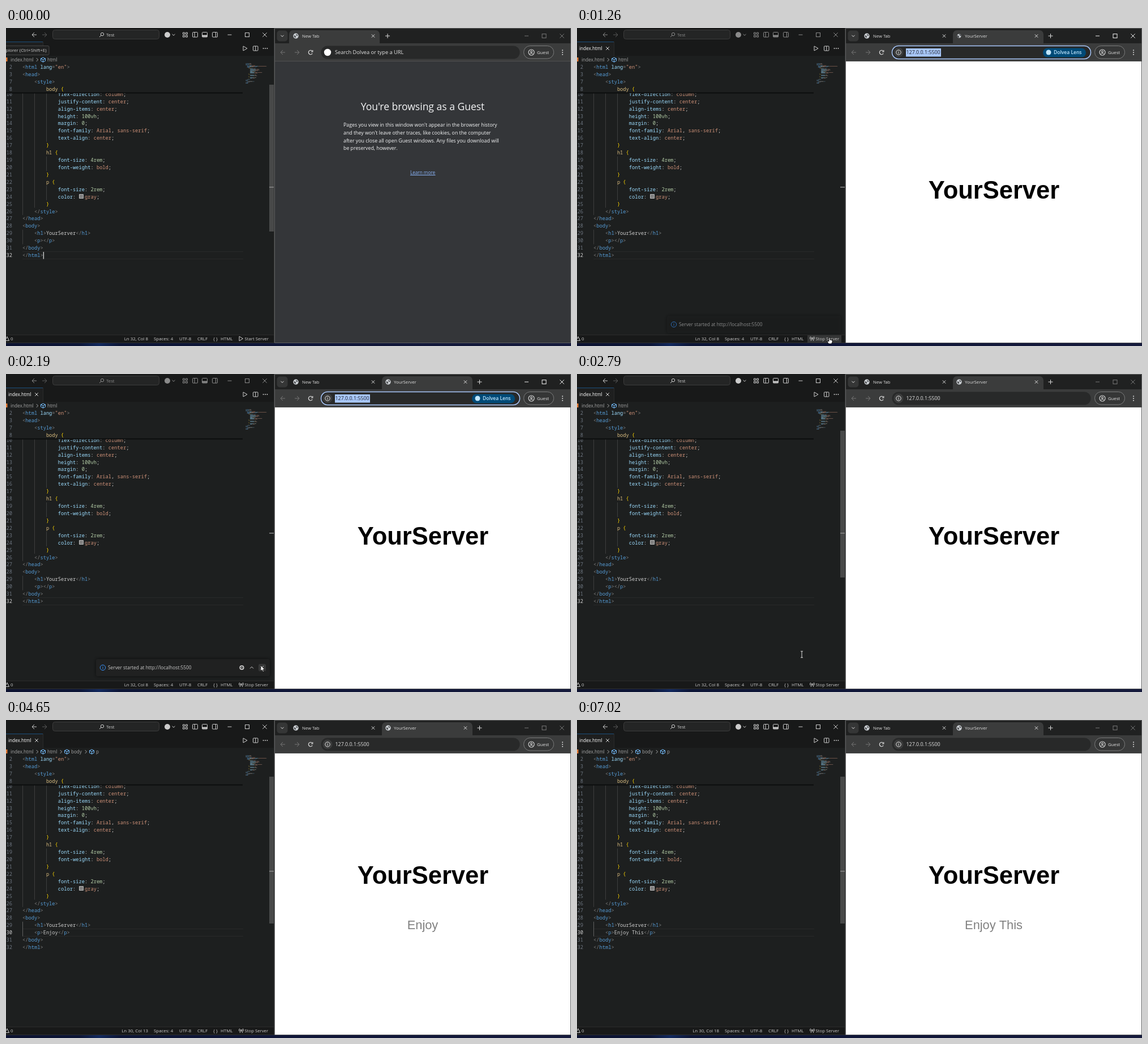
Recreate the animation shown at these times as an HTML page with a canvas. Size 998 px wide and 561 px high, loop 7050 ms.

```html
<!DOCTYPE html>
<html lang="en">
<head>
<meta charset="utf-8">
<title>Live server</title>
<style>
  html, body { margin: 0; width: 100%; height: 100%; overflow: hidden; background: #181818; }
  canvas { display: block; width: 998px; height: 561px; }
</style>
</head>
<body>
<canvas id="stage" width="998" height="561"></canvas>
<script>
const ctx = document.getElementById('stage').getContext('2d');
const LOOP = 7050, STEP = 30;
const UI = '"Open Sans", "Noto Sans", sans-serif';
const MONO = '"Noto Sans Mono", "DejaVu Sans Mono", monospace';
const PAGE = '"Liberation Sans", Arial, sans-serif';
const CHAR = 5.236, ROW = 12.92, CODE_X = 29, CODE_SIZE = 8.727;

// Times in ms at which the state changes
const T = { tipOff: 150, start: 1170, page: 1200, dismiss: 2250, line30: 3240,
  saved1: 4350, popup: 5550, popupOff: 6210, saved2: 6510 };
const TYPED = 'Enjoy This';
const KEYS = [3390, 3450, 3510, 3630, 3720, 5100, 5460, 5640, 5850, 6030];
const POINTER = [[0, -8, 40], [120, -8, 40], [720, 446, 546], [1800, 446, 546],
  [2100, 450, 514], [2670, 450, 514], [3180, 72, 376]];

const CODE = `<!DOCTYPE html>
<html lang="en">
<head>
    <meta charset="UTF-8">
    <meta name="viewport" content="width=device-width">
    <title>YourServer</title>
    <style>
        body {
            display: flex;
            flex-direction: column;
            justify-content: center;
            align-items: center;
            height: 100vh;
            margin: 0;
            font-family: Arial, sans-serif;
            text-align: center;
        }
        h1 {
            font-size: 4rem;
            font-weight: bold;
        }
        p {
            font-size: 2rem;
            color: gray;
        }
    </style>
</head>
<body>
    <h1>YourServer</h1>
    <p></p>
</body>
</html>`.split('\n');

function rect(x, y, w, h, fill) {
  ctx.fillStyle = fill;
  ctx.fillRect(x, y, w, h);
}

function box(x, y, w, h, r, fill, stroke, width = 1) {
  ctx.beginPath();
  ctx.roundRect(x, y, w, h, r);
  paint(fill, stroke, width);
}

function paint(fill, stroke, width = 1) {
  if (fill) { ctx.fillStyle = fill; ctx.fill(); }
  if (stroke) { ctx.strokeStyle = stroke; ctx.lineWidth = width; ctx.stroke(); }
}

function circle(x, y, r, fill, stroke, width) {
  ctx.beginPath();
  ctx.arc(x, y, r, 0, 7);
  paint(fill, stroke, width);
}

function trace(points, x, y) {
  ctx.beginPath();
  for (let i = 0; i < points.length; i += 2) ctx.lineTo(x + points[i], y + points[i + 1]);
}

function line(x, y, points, color, width = 1) {
  trace(points, x, y);
  paint(null, color, width);
}

// y is the middle of the capitals
function text(s, x, y, size, color, { font = UI, weight = 400, align = 'left' } = {}) {
  ctx.font = `${weight} ${size}px ${font}`;
  ctx.textAlign = align;
  ctx.fillStyle = color;
  ctx.fillText(s, x, y + size * 0.35);
}

function mono(s, x, y, color, align) {
  text(s, x, y, CODE_SIZE, color, { font: MONO, weight: 500, align });
}

function cross(x, y, r, color, width = 1) {
  line(x, y, [-r, -r, r, r], color, width);
  line(x, y, [r, -r, -r, r], color, width);
}

function chevron(x, y, w, h, color) {
  line(x, y, [-w, -h, 0, h, w, -h], color);
}

function arrow(x, y, dir, color) {
  line(x, y, [-4 * dir, 0, 4 * dir, 0], color);
  line(x, y, [0, -4, 4 * dir, 0, 0, 4], color);
}

function plus(x, y, color) {
  line(x, y, [-4, 0, 4, 0], color);
  line(x, y, [0, -4, 0, 4], color);
}

function windowButtons(xs, y, color) {
  line(xs[0], y, [-3.5, 0, 3.5, 0], color);
  ctx.strokeStyle = color;
  ctx.strokeRect(xs[1] - 3.5, y - 3.5, 7, 7);
  cross(xs[2], y, 3.7, color);
}

function dots(x, y, dx, dy, color) {
  for (const k of [-1, 0, 1]) circle(x + k * dx, y + k * dy, 0.95, color);
}

function info(x, y, r, color) {
  circle(x, y, r, null, color);
  rect(x - 0.5, y - 0.7, 1, 3, color);
  rect(x - 0.5, y - 2.5, 1, 1, color);
}

function globe(x, y, r) {
  circle(x, y, r, '#c9cdd1');
  ctx.fillStyle = '#4a4d50';
  trace([-3.3, -1, -1, -0.5, 0.2, 1.5, -1, 3.5, -3, 1.5], x, y);
  ctx.fill();
  trace([0, -3.5, 3, -2, 3, 0, 1, -0.5], x, y);
  ctx.fill();
}

function tokens(s) {
  const markup = s.includes('<');
  const rule = markup
    ? /(<[!\/]?)(\w+)|(\w+)(?==)|("[^"]*")|([<>=])|(\s+|[^<>="\s]+)/g
    : /([a-z-]+)(?=:)|(\w+)(?= \{)|([{}])|(\d\w*)|([A-Za-z][\w-]*)|(\s+|[:;,])/g;
  const colors = markup
    ? ['#808080', '#569cd6', '#9cdcfe', '#ce9178', '#808080', '#cccccc']
    : ['#9cdcfe', '#d7ba7d', '#ffd700', '#b5cea8', '#ce9178', '#cccccc'];
  const list = [];
  for (const m of s.matchAll(rule))
    m.slice(1).forEach((part, i) => part && list.push([part, colors[i]]));
  return list;
}

function codeLine(s, y) {
  let x = CODE_X;
  for (const [part, color] of tokens(s)) {
    if (part === 'gray') {
      box(Math.round(x) + 1.5, Math.round(y) - 4.5, 7, 7, 0, '#808080', '#b8b8b8');
      x += 10.6;
    }
    mono(part, x, y, color);
    x += part.length * CHAR;
  }
}

const rowY = n => 401 - (32 - n) * ROW;

function pointerAt(t) {
  const last = POINTER[POINTER.length - 1];
  const i = POINTER.findIndex(k => k[0] > t);
  if (i < 0) return { x: last[1], y: last[2] };
  const [a, b] = [POINTER[i - 1], POINTER[i]];
  const k = (t - a[0]) / (b[0] - a[0]), e = k * k * (3 - 2 * k);
  return { x: a[1] + (b[1] - a[1]) * e, y: a[2] + (b[2] - a[2]) * e };
}

function stateAt(t) {
  const count = KEYS.filter(k => k <= t).length;
  const running = t >= T.start, onP = t >= T.line30;
  const focused = t < T.start || t >= T.dismiss;
  const lastInput = Math.max(0, ...[T.dismiss, T.line30, ...KEYS].filter(k => k <= t));
  const blinkFrom = t < T.start ? 900 : lastInput;
  return {
    t, running, onP, focused, typed: TYPED.slice(0, count),
    dirty: (count > 0 && t < T.saved1) || (count > 5 && t < T.saved2),
    shown: t >= T.saved2 ? TYPED : t >= T.saved1 ? 'Enjoy' : '',
    caret: focused && (t < 500 || Math.floor((t - blinkFrom) / 500) % 2 === 0),
    notice: running && !focused,
    popup: t >= T.popup && t < T.popupOff,
    busy: t >= T.popup && t < T.popupOff + 30,
    slider: t < 690 || t >= 2730,
    pointer: pointerAt(t)
  };
}

function titleBar(s) {
  const color = s.focused ? '#cccccc' : '#8a8a8a';
  rect(0, 0, 474, 23, '#181919');
  arrow(50, 12, -1, color);
  arrow(68, 12, 1, '#5a5a5a');
  box(82.5, 3.5, 188, 16, 4, '#242525', '#3c3c3c');
  circle(170, 11, 2.7, null, color);
  line(168, 13, [0, 0, -3, 3], color);
  text('Test', 177, 12, 7.8, color);
  circle(285, 12, 5, color);
  chevron(296, 12, 2.5, 1.2, color);
  for (const [x, y] of [[312, 8], [317, 8], [312, 13], [317, 13]]) box(x + 0.5, y, 3, 3, 0, null, color);
  for (const x of [334, 351, 369]) box(x - 4.5, 7.5, 9, 8.5, 1, null, color);
  line(333, 8, [0, 0, 0, 8], color);
  rect(347, 12.5, 8, 3, color);
  line(370.5, 8, [0, 0, 0, 8], color);
  windowButtons([395, 426, 457], 12, color);
}

function tabBar(s) {
  rect(0, 23, 474, 26, '#181919');
  rect(0, 24, 65, 25, '#1e1f1f');
  rect(0, 24, 65, 1, '#1c4f7c');
  rect(65, 24, 1, 25, '#2b2b2b');
  text('index.html', 4, 36, 8.2, '#ffffff');
  if (s.dirty) circle(54, 36, 2.8, '#ffffff');
  else cross(54, 36, 2.8, '#dddddd');
  trace([-3, -4, 4, 0, -3, 4, -3, -4], 422, 36);
  paint(null, '#cccccc');
  box(436.5, 32, 8.5, 8, 1, null, '#cccccc');
  line(440.7, 32, [0, 0, 0, 8], '#cccccc');
  dots(458, 36, 3.4, 0, '#cccccc');
}

function crumbs(s) {
  const gray = '#a5a5a5';
  rect(0, 52, 2.5, 7, '#e37933');
  text('index.html', 8, 56, 8.2, gray);
  const parts = [['html', 55]];
  if (s.onP) parts.push(['body', 97], ['p', 141]);
  for (const [name, x] of parts) {
    line(x, 56, [-1.3, -3, 1.5, 0, -1.3, 3], gray);
    trace([-4, -2, 0, -4, 4, -2, 4, 2, 0, 4, -4, 2, -4, -2, 0, 0, 4, -2], x + 10.5, 56);
    paint(null, '#75beff');
    line(x + 10.5, 56, [0, 0, 0, 4], '#75beff');
    text(name, x + 18, 56, 8.1, gray);
  }
}

function minimap(s) {
  ctx.globalAlpha = 0.55;
  CODE.forEach((src, i) => {
    let x = 423;
    for (const [part, color] of tokens(src)) {
      if (part.trim()) rect(x, 62.5 + i * 1.12, part.length * 0.68, 0.8, color);
      x += part.length * 0.68;
    }
  });
  ctx.globalAlpha = 1;
  if (s.slider) rect(465, 100, 8, 259, '#484949');
  rect(465, s.onP ? 266 : 280, 8, 1.5, '#8a8a8a');
}

function editor(s) {
  const current = s.onP ? 30 : 32;
  ctx.save();
  ctx.beginPath();
  ctx.rect(0, 114, 474, 427);
  ctx.clip();
  for (const edge of [-7, 6]) rect(CODE_X, Math.round(rowY(current)) + edge, 390, 1, '#282929');
  const guides = [[0, 9, 26], [4, 9, 25], [8, 9, 16], [8, 19, 20], [8, 23, 24], [0, 29, 30]];
  guides.forEach(([col, from, to], i) => {
    const top = rowY(from) - ROW / 2;
    const active = s.onP && i === 5;
    rect(Math.round(CODE_X + col * CHAR), top, 1, (to - from + 1) * ROW, active ? '#606060' : '#3d3e3e');
  });
  for (let n = 10; n <= 32; n++) {
    const y = rowY(n);
    const src = n === 30 ? `    <p>${s.typed}</p>` : CODE[n - 1];
    mono(n, 11, y, n === current ? '#d0d0d0' : '#6e7681', 'right');
    codeLine(src, y);
  }
  if (s.caret) {
    const col = s.onP ? 7 + s.typed.length : 7;
    rect(CODE_X + col * CHAR, rowY(current) - 6, 1.4, 12.5, '#d0d0d0');
  }
  ctx.restore();

  [2, 3, 7, 8].forEach((n, i) => {
    const y = 69 + i * ROW;
    mono(n, 11, y, '#6e7681', 'right');
    codeLine(CODE[n - 1], y);
  });
  rect(0, 113.5, 418, 2, '#0d0e0e');
  minimap(s);
}

function wrench(x, y) {
  line(x, y, [-4, 4, 0.5, -0.5], '#cccccc', 1.8);
  ctx.beginPath();
  ctx.arc(x + 2, y - 2, 2.3, -0.4, 4.4);
  paint(null, '#cccccc', 1.3);
}

function suggestions(s) {
  if (!s.popup) return;
  const word = s.typed.slice(6);
  const rows = 'Thead'.startsWith(word) ? [word, 'Thead'] : [word];
  box(107.5, 382.5, 294, rows.length * 13 + 1, 2, '#202121', '#454545');
  rect(108, 383, 293, 12.5, '#04395e');
  rows.forEach((name, i) => {
    const y = 389 + i * ROW;
    wrench(115, y);
    mono(name, 123, y, '#d4d4d4');
    mono(word, 123, y, '#5eb8ff');
  });
  text('Emmet Abbreviation', 395, 389, 7.5, '#d4d4d4', { font: MONO, weight: 500, align: 'right' });
}

function antenna(x, y, color) {
  line(x, y, [-2.5, 4, 0, -1, 2.5, 4], color);
  circle(x, y - 1, 1, color);
  for (const d of [-1, 1]) for (const r of [2.2, 4]) {
    ctx.beginPath();
    ctx.arc(x, y - 1, r, d < 0 ? 2.4 : -0.75, d < 0 ? 3.9 : 0.75);
    paint(null, color, 0.9);
  }
}

function statusBar(s) {
  const color = '#cccccc', size = 7.9, y = 548;
  rect(0, 541, 474, 14, '#181919');
  rect(0, 541, 474, 1, '#2b2b2b');
  if (s.pointer.y > 541 && s.pointer.x > 407) rect(407, 542, 60, 13, '#353636');
  trace([-3.5, 3.5, 0, -3.5, 3.5, 3.5, -3.5, 3.5], 2, y);
  paint(null, color);
  text('0', 8, y, size, color);
  const where = s.onP ? `Ln 30, Col ${8 + s.typed.length}` : 'Ln 32, Col 8';
  text(where, 251, y, size, color, { align: 'right' });
  text('Spaces: 4', 261, y, size, color);
  text('UTF-8', 306, y, size, color);
  text('CRLF', 338, y, size, color);
  if (s.busy) {
    const a = (s.t - 5700) / 1000 * 6.283 - 2.4;
    ctx.beginPath();
    ctx.arc(371, y, 4, a, a + 1.7);
    paint(null, color);
  } else {
    text('{ }', 366, y, size, color);
  }
  text('HTML', 379, y, size, color);
  if (s.running) antenna(415.5, y, color);
  else {
    trace([-3, -4, 3.5, 0, -3, 4, -3, -4], 415, y);
    paint(null, color);
  }
  text(s.running ? 'Stop Server' : 'Start Server', 421.5, y, 7.75, color);
}

function notice(s) {
  if (!s.notice) return;
  const k = Math.min(1, (s.t - T.start) / 180), y = 528 - 10 * k;
  ctx.save();
  ctx.globalAlpha = 0.3 + 0.7 * k;
  ctx.shadowColor = 'rgba(0,0,0,.6)';
  ctx.shadowBlur = 6;
  box(159, y - 15, 307, 30, 3, '#202121');
  ctx.shadowBlur = 0;
  info(171, y, 4.7, '#3794ff');
  text('Server started at http://localhost:5500', 180, y, 8.35, '#c8c8c8');
  if (s.pointer.y < 541) {
    circle(416.5, y, 3.2, null, '#cccccc', 1.8);
    circle(416.5, y, 1, '#cccccc');
    chevron(434, y, 3, -1.5, '#cccccc');
    box(446, y - 6.5, 13, 13, 3, '#383939');
    cross(452, y, 3, '#cccccc');
  }
  ctx.restore();
}

function tooltip(s) {
  if (s.t >= T.tipOff) return;
  box(-6, 31.5, 82, 16, 2, '#202121', '#454545');
  text('Explorer (Ctrl+Shift+E)', 71.5, 39.5, 7.9, '#cccccc', { align: 'right' });
}

function browserTabs(s) {
  rect(474, 0, 524, 28, '#202121');
  box(478.5, 4.5, 19, 19, 5, '#353636');
  chevron(488, 14, 2.6, 1.3, '#dddddd');
  const x = s.running ? 664 : 500;
  box(x, 4, 160, 26, [7, 7, 0, 0], '#3b3c3c');
  globe(512, 14, 4.7);
  text('New Tab', 523, 14, 7.7, '#dedede');
  cross(648.5, 14, 2.7, '#dddddd');
  if (s.running) {
    globe(675, 14, s.t < 1320 ? 3.4 : 4.7);
    text('YourServer', 685, 14, 7.75, '#dedede');
    cross(811.5, 14, 2.7, '#dddddd');
  }
  plus(s.running ? 836.5 : 674, 14, '#dddddd');
  windowButtons([919.5, 950.5, 982], 14, s.focused ? '#777777' : '#f0f0f0');
}

function toolbar(s) {
  const light = '#e4e4e4', y = 43;
  rect(474, 27, 524, 32, '#3b3c3c');
  arrow(489, y, -1, '#757575');
  arrow(514, y, 1, '#757575');
  ctx.beginPath();
  ctx.arc(538, y, 3.6, 0.5, 5.5);
  paint(null, light, 1.2);
  line(538, y, [3.8, -4, 3.8, -1, 0.8, -1], light, 1.1);
  box(556.5, 31.5, 351, 23, 11.5, '#282929', s.focused ? null : '#a8c7fa', 1.5);
  if (!s.running) {
    circle(568, y, 6.2, '#ffffff');
    text('Search Dolvea or type a URL', 581, y, 9.25, light);
  } else {
    circle(568, y, 8.5, '#3b3c3c');
    info(568, y, 4.2, light);
    if (!s.focused) {
      rect(581, 36, 62, 14.5, '#a8c7fa');
      box(823, 35.5, 76, 16, 8, '#004a77');
      circle(833, y, 4.5, '#c2e7ff');
      text('Dolvea Lens', 842, y + 0.5, 8.5, '#c2e7ff', { weight: 600 });
    }
    text('127.0.0.1:5500', 581.5, y, 8.9, s.focused ? light : '#20242c');
  }
  box(914.5, 31.5, 53, 22.5, 11.2, '#353636', '#7c7d7d');
  circle(928, y, 5, null, light, 1.1);
  circle(928, y - 1.2, 1.6, null, light);
  ctx.beginPath();
  ctx.arc(928, y + 4.5, 3.2, 3.6, 5.8);
  paint(null, light);
  text('Guest', 938, y, 7.7, light);
  dots(983, y, 0, 3.7, light);
  rect(474, 58, 524, 1, '#505151');
}

function guestPage() {
  const color = '#f4f5f6';
  rect(474, 59, 524, 496, '#343639');
  text("You're browsing as a Guest", 736, 139, 17.5, color, { align: 'center' });
  ["Pages you view in this window won't appear in the browser history",
    "and they won't leave other traces, like cookies, on the computer",
    'after you close all open Guest windows. Any files you download will',
    'be preserved, however.'
  ].forEach((s, i) => text(s, 596, 171 + i * 13.8, 8.8, color));
  text('Learn more', 736, 255, 8.2, '#8ab4f8', { align: 'center' });
  rect(714, 259, 44.5, 1, '#8ab4f8');
}

function servedPage(s) {
  rect(474, 59, 524, 496, '#ffffff');
  const center = { font: PAGE, align: 'center' };
  text('YourServer', 736.5, s.shown ? 273.4 : 285.4, 43.5, '#000000', { ...center, weight: 700 });
  text(s.shown, 736, 361.5, 21.8, '#808080', center);
}

function taskbar() {
  const g = ctx.createLinearGradient(0, 0, 998, 0);
  [[0, '#0c1230'], [0.13, '#0c1536'], [0.165, '#11285e'], [0.2, '#0c1536'], [0.6, '#101638'], [1, '#151a3c']]
    .forEach(([at, color]) => g.addColorStop(at, color));
  rect(0, 555, 998, 6, g);
  rect(0, 555, 474, 1, '#2e3032');
}

function drawPointer(s) {
  const { x, y } = s.pointer;
  if (s.t > KEYS[0] - 30) return;
  if (y > 541) {
    trace([-1, 0, 1, 0, 1, 4, 5, 5, 5, 8, 3.5, 11, -1.5, 11, -4, 7, -3, 6, -1, 7, -1, 0], x, y);
  } else if (x < 418 && y > 114 && !(s.notice && y > 500)) {
    line(x, y, [-2, -5.5, 2, -5.5], '#dddddd');
    line(x, y, [0, -5.5, 0, 5.5], '#dddddd');
    line(x, y, [-2, 5.5, 2, 5.5], '#dddddd');
    return;
  } else {
    trace([0, 0, 0, 10, 2.3, 8, 4, 11.5, 5.5, 10.8, 4, 7.3, 7, 7.3, 0, 0], x, y);
  }
  paint('#ffffff', '#000000', 0.8);
}

function draw(t) {
  const s = stateAt(t);
  rect(0, 0, 998, 561, '#1d1f1f');
  titleBar(s);
  tabBar(s);
  crumbs(s);
  editor(s);
  suggestions(s);
  statusBar(s);
  notice(s);
  tooltip(s);
  rect(473, 0, 1, 555, '#333434');
  browserTabs(s);
  toolbar(s);
  if (t >= T.page) servedPage(s);
  else guestPage();
  taskbar();
  box(474.5, 0.5, 523, 555, 0, null, '#5f6061');
  drawPointer(s);
}

function tick() {
  const t = performance.now() % LOOP;
  draw(Math.floor(t / STEP) * STEP);
  requestAnimationFrame(tick);
}
tick();
</script>
</body>
</html>
```
